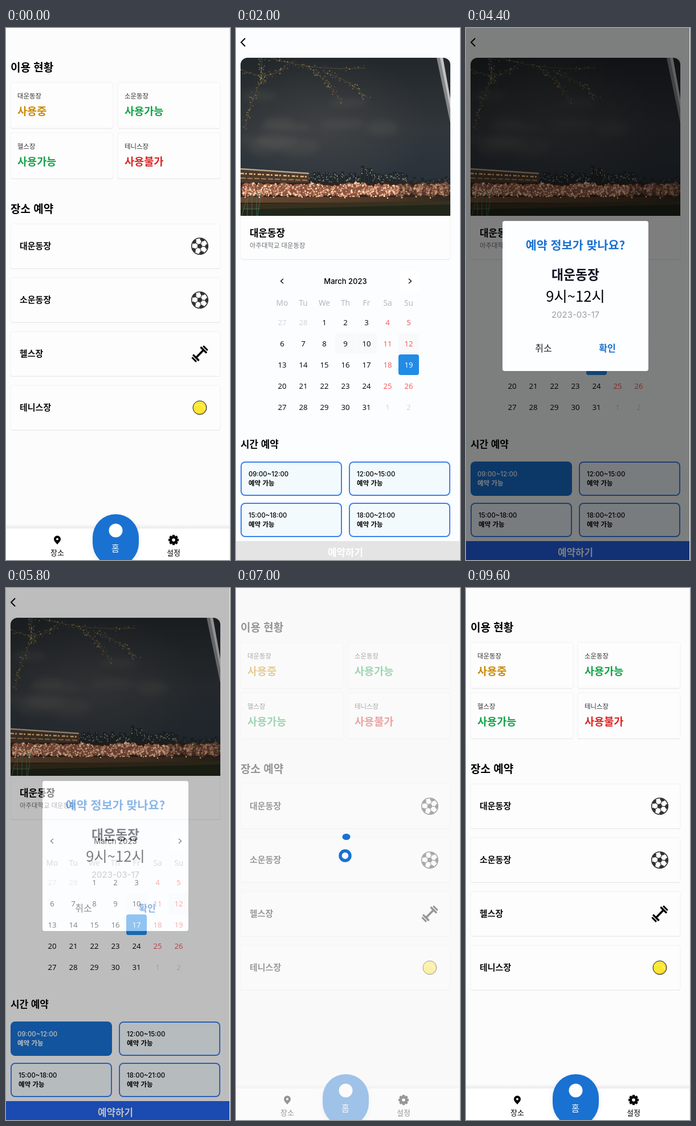
These frames come from a looping animation (393x929 px, 9900 ms). An HTML page:

```html
<!DOCTYPE html>
<html lang="ko">
<head>
<meta charset="utf-8">
<title>장소 예약</title>
<style>
html, body { margin: 0; width: 100%; height: 100%; overflow: hidden; background: #fcfcfc; }
svg { display: block; width: 100vw; height: 100vh; }
text { font-family: 'Noto Sans CJK KR', 'Noto Sans CJK', sans-serif; }
.inter { font-family: Inter, sans-serif; }
.open { font-family: 'Open Sans', 'Noto Sans', sans-serif; }
</style>
</head>
<body>
<svg id="stage" viewBox="0 0 393 929"></svg>
<script>
const LOOP = 9900, TICK = 100;
const BLUE = '#1971d2';
const stage = document.getElementById('stage');

// Markup helpers
const attrs = o => Object.entries(o).map(([k, v]) => ` ${k}="${v}"`).join('');
const text = (x, y, s, size, fill = '#000', o = {}) =>
  `<text${attrs({ x, y, 'font-size': size, fill, ...o })}>${s}</text>`;
const rect = (x, y, width, height, fill, o = {}) =>
  `<rect${attrs({ x, y, width, height, fill, ...o })}/>`;
const circle = (cx, cy, r, fill, o = {}) => `<circle${attrs({ cx, cy, r, fill, ...o })}/>`;
const path = (d, o = {}) => `<path${attrs({ d, fill: 'none', ...o })}/>`;
const group = (id, body, o = {}) => `<g${attrs({ id, ...o })}>${body}</g>`;
const BOLD = { 'font-weight': 700 };
const MED = { 'font-weight': 500 };
const MID = { 'text-anchor': 'middle' };

function seeded(seed) {
  return () => (seed = (seed * 16807) % 2147483647) / 2147483647;
}

const card = (x, y, w, h) =>
  rect(x, y + 1, w, h, '#e2e2e2', { rx: 4 }) +
  rect(x, y, w, h, '#fdfdfd', { rx: 4, stroke: '#f1f1f1', 'stroke-width': 1 });

// Icons
function polygon(cx, cy, r, n, turn) {
  let d = '';
  for (let i = 0; i < n; i++) {
    const a = turn + i * 2 * Math.PI / n;
    d += (i ? 'L' : 'M') + (cx + r * Math.cos(a)).toFixed(1) + ' ' + (cy + r * Math.sin(a)).toFixed(1);
  }
  return d + 'Z';
}

function soccerBall(x, y) {
  let s = circle(0, 0, 14.3, '#fff');
  s += path(polygon(0, 0, 5, 5, -1.2), { fill: '#333' });
  for (let i = 0; i < 5; i++) {
    const a = -1.2 + i * 2 * Math.PI / 5, c = Math.cos(a), n = Math.sin(a);
    s += path(`M${5 * c} ${5 * n}L${10 * c} ${10 * n}`, { stroke: '#333', 'stroke-width': 1.2 });
    s += path(polygon(13 * c, 13 * n, 4.6, 5, a + Math.PI), { fill: '#333', 'clip-path': 'url(#ball)' });
  }
  s += circle(0, 0, 14.3, 'none', { stroke: '#333', 'stroke-width': 1.6 });
  return `<g transform="translate(${x} ${y})">${s}</g>`;
}

const dumbbell = (x, y) => `<g transform="translate(${x} ${y}) rotate(-45)">` +
  rect(-8, -1.8, 16, 3.6, '#000') +
  [-1, 1].map(k => rect(k * 9.5 - 1.7, -7.5, 3.4, 15, '#000', { rx: 1 }) +
    rect(k * 14 - 1.5, -5.5, 3, 11, '#000', { rx: 1 })).join('') + '</g>';

const tennisBall = (x, y) =>
  circle(x, y, 12, '#f5b921') + circle(x - 1, y - 1, 10.8, '#fde72f') +
  path(`M${x - 8} ${y - 3}Q${x - 1} ${y - 8} ${x + 5} ${y - 3}T${x + 8} ${y + 4}`, { stroke: '#fff8b0', 'stroke-width': 1.2 }) +
  circle(x, y, 12, 'none', { stroke: '#222', 'stroke-width': 1 });

function gear(x, y) {
  let s = circle(x, y, 7, '#000');
  for (let i = 0; i < 8; i++) {
    s += rect(x - 2.2, y - 9, 4.4, 5, '#000', { rx: 1, transform: `rotate(${i * 45} ${x} ${y})` });
  }
  return s + circle(x, y, 2.8, '#fff');
}

const pin = (x, y) =>
  path(`M${x} ${y + 8}C${x - 3} ${y + 4} ${x - 6} ${y + 2} ${x - 6} ${y - 1.5}a6 6 0 0 1 12 0C${x + 6} ${y + 2} ${x + 3} ${y + 4} ${x} ${y + 8}Z`, { fill: '#000' }) +
  circle(x, y - 1.5, 2, '#fff');

// Home screen
const places = ['대운동장', '소운동장', '헬스장', '테니스장'];
const states = [['사용중', '#ca8a04'], ['사용가능', '#16a34a'], ['사용가능', '#16a34a'], ['사용불가', '#dc2626']];

function homeScreen() {
  let s = rect(0, 0, 393, 929, '#fcfcfc');
  s += text(8, 75.5, '이용 현황', 19, '#000', BOLD);
  s += text(8, 322.5, '장소 예약', 19, '#000', BOLD);
  places.forEach((name, i) => {
    const x = 8 + 188 * (i % 2), y = 95 + 88 * (i >> 1), row = 342 + 94 * i;
    s += card(x, y, 180, 80);
    s += text(x + 12, y + 28, name, 11.4, '#333');
    s += text(x + 12, y + 57, states[i][0], 18.6, states[i][1], BOLD);
    s += card(8, row, 368, 78);
    s += text(24, row + 44, name, 15, '#111', BOLD);
  });
  s += soccerBall(340, 381) + soccerBall(340, 475) + dumbbell(340, 569) + tennisBall(340, 663);
  s += rect(0, 866, 392, 8, 'url(#navShade)') + rect(0, 874, 392, 55, '#fff');
  s += rect(152, 852, 81, 91, '#000', { rx: 40.5, opacity: .1, filter: 'url(#soft)' });
  s += rect(152, 849, 81, 91, BLUE, { rx: 40.5 });
  s += circle(192.5, 877.5, 12, '#fff');
  s += text(192, 913.5, '홈', 15, '#fff', MID);
  s += pin(90, 894) + text(90, 920.5, '장소', 13, '#000', MID);
  s += gear(294, 894) + text(294, 920.5, '설정', 13, '#000', MID);
  return s;
}

// Night picture
function branch(rnd, x0, y0, cx, cy, x1, y1) {
  let s = path(`M${x0} ${y0}Q${cx} ${cy} ${x1} ${y1}`, { stroke: '#5d5136', 'stroke-width': .8 });
  for (let i = 0; i < 42; i++) {
    const t = rnd(), u = 1 - t;
    const x = u * u * x0 + 2 * u * t * cx + t * t * x1 + (rnd() - .5) * 12;
    const y = u * u * y0 + 2 * u * t * cy + t * t * y1 + (rnd() - .5) * 10;
    s += circle(x.toFixed(1), y.toFixed(1), (.4 + rnd() * .8).toFixed(1), '#a08a4a', { opacity: .75 });
  }
  return s;
}

// A round crown of small blossoms over a dark core
function cherry(rnd, x, y, w, h, dim) {
  const tones = ['#ffdcb8', '#e9ad88', '#c98463', '#8c5340', '#f6c8a2'];
  let s = `<ellipse${attrs({ cx: x, cy: y, rx: w, ry: h, fill: '#8a5542', opacity: dim })}/>`;
  for (let i = 0; i < 48; i++) {
    const a = rnd() * 2 * Math.PI, k = Math.sqrt(rnd());
    s += circle((x + w * k * Math.cos(a)).toFixed(1), (y + h * k * Math.sin(a)).toFixed(1),
      (.7 + rnd() * 1.3).toFixed(1), tones[i % 5], { opacity: dim });
  }
  return s + rect(x - 1, y + h - 3, 1.5, 8, '#3a2219');
}

function nightPhoto() {
  const rnd = seeded(77);
  let s = rect(8, 52, 368, 276, 'url(#sky)') + rect(8, 52, 368, 276, 'url(#skyGlow)');
  for (let i = 0; i < 10; i++) {
    s += `<ellipse${attrs({ cx: 40 + rnd() * 220, cy: 105 + rnd() * 105, rx: 25 + rnd() * 30, ry: 6 + rnd() * 10, fill: '#77736a', opacity: .16, filter: 'url(#cloud)' })}/>`;
  }
  s += path('M352 52h11L376 124v42Z', { fill: '#85878a' }) + path('M358 52h5L376 124v18Z', { fill: '#c3c3c2' });
  // Skyline
  for (let x = 128; x < 376; x += 7) {
    const far = x > 296 ? 9 : 0, peak = x > 215 && x < 240 ? 12 : 0;
    const top = 259 - rnd() * 9 - peak + far;
    s += rect(x, top, 6, 290 - top, '#22282a');
    for (let k = 0; k < 5; k++) {
      s += rect(x + rnd() * 5, top + 1 + rnd() * 12, 1.2, 1.5, '#d3d0ae', { opacity: far ? .35 : .8 });
    }
  }
  // Lit building
  s += path('M8 245L128 253V275H8Z', { fill: '#4b3a2d' });
  s += path('M8 246L128 254', { stroke: '#b8a48c', 'stroke-width': 2.5 });
  s += path('M8 254L128 260', { stroke: '#e9b981', 'stroke-width': 2.5, 'stroke-dasharray': '6 2 3 4' });
  s += path('M8 262L128 266', { stroke: '#a87f59', 'stroke-width': 2, 'stroke-dasharray': '9 3' });
  // Blossom row and field
  s += rect(8, 270, 368, 30, '#33231c');
  for (let x = 14; x < 376; x += 13) {
    const dim = x > 285 ? .4 : 1;
    s += cherry(rnd, x + rnd() * 5, 281 + rnd() * 4, 9 + rnd() * 4, 9 + rnd() * 4, dim);
  }
  s += rect(8, 295, 368, 33, '#20261a') + rect(8, 295, 368, 10, 'url(#path)');
  for (let i = 0; i < 14; i++) s += circle(16 + i * 25, 294 + rnd() * 3, 1.2, '#ffd58a');
  s += path('M8 307L376 302V308L8 317Z', { fill: '#38301f' });
  s += path('M10 328L18 300L44 287L38 328M20 299V328M28 295V328M36 291V328M14 316H42', { stroke: '#4a7a5d', 'stroke-width': .8 });
  s += branch(rnd, 46, 52, 42, 90, 50, 95) + branch(rnd, 50, 85, 25, 120, 16, 178);
  s += branch(rnd, 8, 72, 60, 98, 92, 62) + branch(rnd, 60, 52, 130, 75, 228, 70);
  s += branch(rnd, 125, 68, 160, 88, 185, 130) + branch(rnd, 160, 78, 200, 92, 233, 124);
  return group('photo', s, { 'clip-path': 'url(#photoClip)' });
}

// Booking screen
const hours = ['09:00~12:00', '12:00~15:00', '15:00~18:00', '18:00~21:00'];

function slot(i, on) {
  const x = 8 + 190 * (i % 2), y = 757 + 72 * (i >> 1);
  const ink = on ? '#fff' : '#000', tx = x + (on ? 12 : 14);
  const box = on ? rect(x, y, 178, 60, BLUE, { rx: 8 })
    : rect(x + 1, y + 1, 176, 58, '#f3fafe', { rx: 7, stroke: '#3b82f0', 'stroke-width': 2 });
  return box + text(tx, y + 26, hours[i], 11.4, ink, { ...MED, class: 'inter' }) +
    text(tx, y + 42, '예약 가능', 11.5, ink, BOLD);
}

function bookingScreen() {
  let s = rect(0, 0, 393, 929, '#fcfdfe');
  s += path('M16 18L9 25L16 32', { stroke: '#000', 'stroke-width': 2 });
  s += card(8, 52, 368, 352) + nightPhoto();
  s += text(24, 364, '대운동장', 16.9, '#000', BOLD);
  s += text(24, 384, '아주대학교 대운동장', 11.4, '#6b7075');
  s += rect(287, 424, 34, 36, '#fff', { rx: 4 });
  s += path('M83 438L78.500 442L83 446M303 438L307.500 442L303 446', { stroke: '#000', 'stroke-width': 1.3 });
  s += text(192, 447, 'March 2023', 13, '#000', { ...MED, ...MID, class: 'inter' });
  s += group('days', '');
  s += text(8, 733, '시간 예약', 16.9, '#000', BOLD);
  s += group('slot', '') + slot(1) + slot(2) + slot(3);
  s += rect(0, 896, 392, 33, '#e4e4e4', { id: 'bar' });
  s += text(192, 921.5, '예약하기', 16.9, '#fff', { ...BOLD, ...MID });
  return s;
}

// [day, from, to]
const hovers = [[12, 0, LOOP], [9, 2000, 2100], [10, 2000, LOOP], [24, 2300, 4400], [31, 2700, 4400], [17, 3100, 3200]];

function calendar(t) {
  const picked = t < 2100 ? 19 : t < 3200 ? 9 : 17;
  let s = '';
  ['Mo', 'Tu', 'We', 'Th', 'Fr', 'Sa', 'Su'].forEach((d, i) => {
    s += text(81 + 37 * i, 485, d, 13.8, '#adb5bd', { ...MID, class: 'open' });
  });
  for (let i = 0; i < 35; i++) {
    const col = i % 7, x = 81 + 37 * col, y = 514 + 37 * Math.floor(i / 7);
    const day = i - 1, inside = day > 0 && day < 32;
    const label = day < 1 ? 28 + day : day > 31 ? day - 31 : day;
    let ink = !inside ? '#ced4da' : col > 4 ? '#fa5252' : '#000';
    if (day === picked) {
      s += rect(x - 18, y - 18, 36, 36, '#228be6', { rx: 4 });
      ink = '#fff';
    } else if (hovers.some(([d, a, b]) => d === day && t >= a && t < b)) {
      s += rect(x - 18, y - 18, 36, 36, '#f8f9fa', { rx: 4 });
    }
    s += text(x, y + 5, label, 13.2, ink, { ...MID, class: 'open' });
  }
  return s;
}

function dialog() {
  return rect(0, 0, 393, 929, '#000', { opacity: .5 }) +
    rect(64, 337, 256, 262, '#fdfeff', { rx: 4 }) +
    text(192, 386.5, '예약 정보가 맞나요?', 20.7, BLUE, { ...BOLD, ...MID }) +
    text(192, 438.5, '대운동장', 22.8, '#0b1020', { ...BOLD, ...MID }) +
    text(192, 477.5, '9시~12시', 25.5, '#000', MID) +
    text(192, 506, '2023-03-17', 15, '#9a9fa6', { ...MID, class: 'inter' }) +
    text(136, 564.5, '취소', 16, '#222', MID) +
    text(248, 564.5, '확인', 16, BLUE, { ...BOLD, ...MID });
}

const defs = `<defs>
<linearGradient id="sky" x1="0" y1="0" x2="0" y2="1"><stop offset="0" stop-color="#22272b"/><stop offset=".45" stop-color="#31363b"/><stop offset=".78" stop-color="#29323b"/></linearGradient>
<radialGradient id="skyGlow" cx=".4" cy=".45" r=".5"><stop offset="0" stop-color="#5c5a55" stop-opacity=".35"/><stop offset="1" stop-color="#5c5a55" stop-opacity="0"/></radialGradient>
<linearGradient id="path"><stop offset="0" stop-color="#6b4932"/><stop offset=".7" stop-color="#4b3626"/><stop offset="1" stop-color="#2b2a1e"/></linearGradient>
<linearGradient id="navShade" x1="0" y1="0" x2="0" y2="1"><stop offset="0" stop-color="#000" stop-opacity="0"/><stop offset="1" stop-color="#000" stop-opacity=".07"/></linearGradient>
<clipPath id="ball"><circle r="14.300"/></clipPath>
<clipPath id="photoClip"><path d="M8 328V64a12 12 0 0 1 12-12H364a12 12 0 0 1 12 12V328Z"/></clipPath>
<filter id="soft" x="-30%" y="-60%" width="160%" height="220%"><feGaussianBlur stdDeviation="4"/></filter>
<filter id="cloud" x="-50%" y="-100%" width="200%" height="300%"><feGaussianBlur stdDeviation="6"/></filter>
</defs>`;

stage.innerHTML = defs +
  group('home', homeScreen()) +
  group('booking', bookingScreen()) +
  group('dialog', dialog()) +
  group('veil', rect(0, 0, 393, 929, '#f9f9f9', { opacity: .6 }) +
    `<ellipse id="bead" cx="193.500" cy="434.500" rx="7" ry="5.500" fill="${BLUE}"/>` +
    circle(191.5, 467.5, 8.5, 'none', { stroke: BLUE, 'stroke-width': 5.5 })) +
  group('toast', rect(8, 22, 368, 52, '#000', { rx: 8, opacity: .12, filter: 'url(#soft)' }) +
    rect(8, 20, 368, 52, '#fff', { rx: 8 })) +
  rect(392, 0, 1, 929, '#ececec');

// Timeline
const el = {};
stage.querySelectorAll('[id]').forEach(n => el[n.id] = n);
const ramp = (t, a, b) => Math.min(1, Math.max(0, (t - a) / (b - a)));
const easeOut = k => 1 - (1 - k) ** 3;

function fade(node, opacity) {
  node.style.display = opacity > 0 ? '' : 'none';
  node.style.opacity = opacity;
}

function draw(t) {
  const booking = t >= 800 && t < 6000;
  fade(el.home, booking ? 0 : 1);
  fade(el.booking, booking ? 1 : 0);
  if (booking) {
    el.days.innerHTML = calendar(t);
    el.slot.innerHTML = slot(0, t >= 3700);
    el.bar.setAttribute('fill', t >= 3700 ? '#2563eb' : '#e4e4e4');
  }
  fade(el.dialog, t < 4400 ? 0 : 1 - ramp(t, 5700, 5900));
  fade(el.veil, ramp(t, 6400, 6700) * (1 - ramp(t, 7400, 7800)));
  el.bead.setAttribute('cy', 434.5 + 16 * Math.abs(Math.sin(Math.PI * (t - 7000) / 700)));
  const drop = easeOut(ramp(t, 7400, 8300));
  fade(el.toast, drop > 0 ? 1 - ramp(t, 9200, 9600) : 0);
  el.toast.setAttribute('transform', `translate(0 ${-80 * (1 - drop)})`);
}

let last = -1;
function loop() {
  const t = Math.floor((performance.now() % LOOP) / TICK) * TICK;
  if (t !== last) draw(last = t);
  requestAnimationFrame(loop);
}
loop();
</script>
</body>
</html>
```
